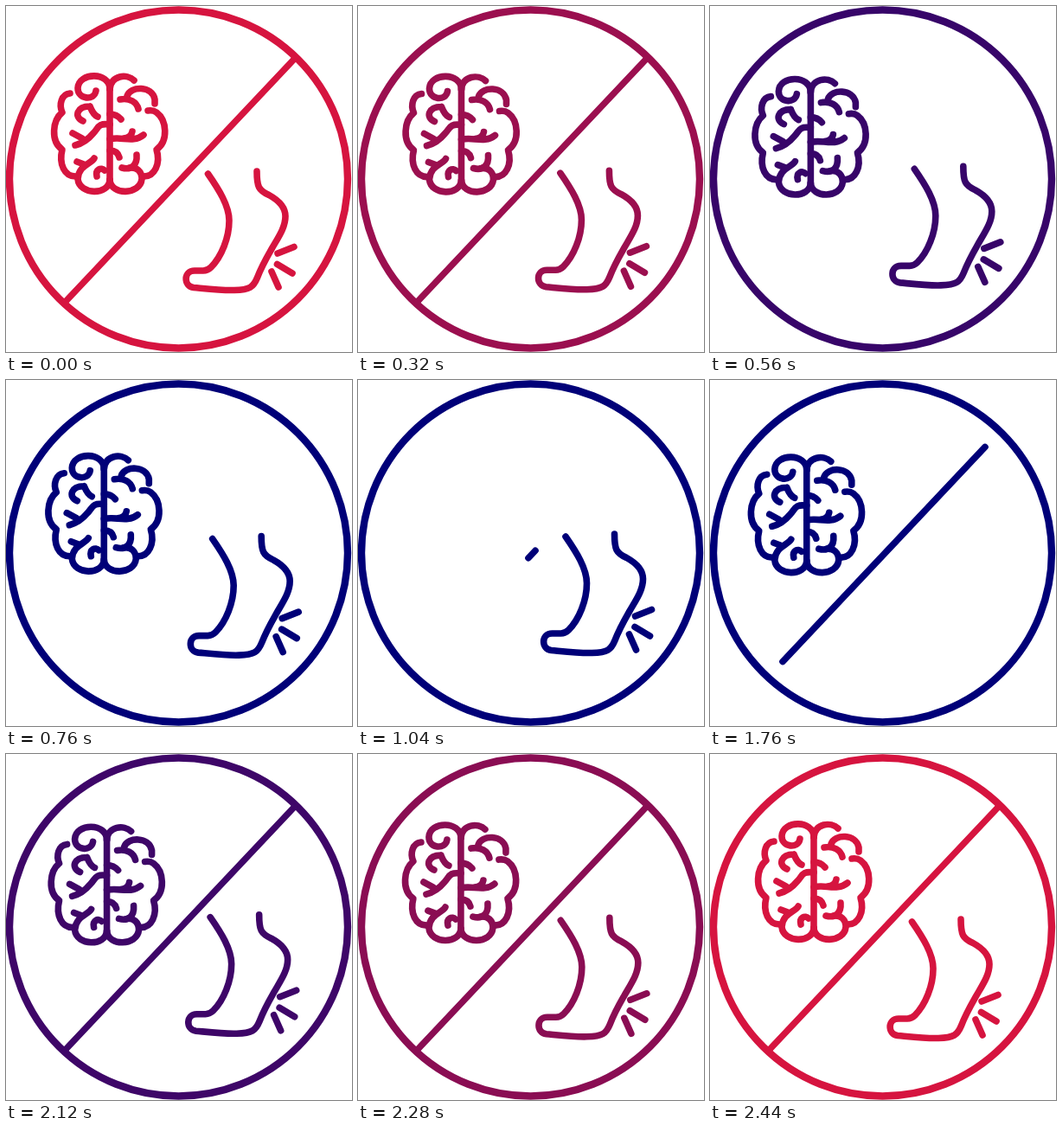
Recreate the animation shown at these times as an HTML page. Size 400 by 400 pixels, loop 2640 ms.

```html
<!DOCTYPE html>
<html lang="en">
<head>
<meta charset="utf-8">
<title>Mind and heel</title>
<style>
html, body { margin: 0; height: 100%; overflow: hidden; background: #fff; }
svg { display: block; width: 100vw; height: 100vh; fill: none; stroke: currentColor; stroke-width: 7.6; stroke-linecap: round; stroke-linejoin: round; }
</style>
</head>
<body>
<svg id="stage" viewBox="0 0 400 400">
  <circle cx="199.5" cy="200" r="195.5" stroke-width="8.4"/>
  <path id="slash"/>
  <g id="brain">
    <path d="M120 94V204"/>
    <!-- left half -->
    <path d="M120 96C120 76 84 76 83 95C83 108 102 110 104 98"/>
    <path d="M74 101C64 102 61 114 65 123C54 132 51 156 65 166C61 182 67 198 82 197"/>
    <path d="M89 133C78 128 82 116 97 116M97 116Q101 126 106 128"/>
    <path d="M120 137C106 135 107 141 101 147Q92 158 80 161M77 147L88 153"/>
    <path d="M82 180L90 183M102 176C98 183 84 184 83 200C85 219 119 219 120 201"/>
    <path d="M105 197C103 189 110 186 114 190"/>
    <!-- right half -->
    <path d="M120 96C121 80 140 78 148 86"/>
    <path d="M132 108C143 106 151 111 153 119M140 104C144 92 169 92 172 108V113"/>
    <path d="M164 121Q170 120 174 123C186 132 188 156 174 166C179 182 172 198 158 197"/>
    <path d="M120 125Q128 125 133 131"/>
    <path d="M120 154C132 150 147 159 159 149M136 153Q145 152 146 145"/>
    <path d="M120 167Q129 167 131 175M134 187C145 190 152 184 151 172"/>
    <path d="M143 187C151 186 157 191 157 200C155 219 121 219 120 201"/>
  </g>
  <g id="foot">
    <path d="M233.5 194C246 212 258 231 258 248C258 268 249 290 237 302Q233 306 228 306H218C205 306 205 324 217 325.5C233 327 250 329 264 328.5C282 328 286 325 290.5 314C296 300 299 295 307 281C315 267 323 256 323 243C323 231 314 224 304 218.5C292 213 290 209 290 191"/>
    <path d="M314 286L333 278.5M313.5 298.5L331 309M307 307L315 325"/>
  </g>
</svg>
<script>
const LOOP = 2640, STEP = 40;
const [stage, slash, brain, foot] = ["stage", "slash", "brain", "foot"].map(id => document.getElementById(id));
const red = [214, 20, 63], navy = [0, 0, 120];

const ramp = (t, a, b) => Math.min(1, Math.max(0, (t - a) / (b - a)));
const ease = (t, a, b) => (1 - Math.cos(Math.PI * ramp(t, a, b))) / 2;
const hide = (el, on) => el.style.display = on ? "none" : "";
const move = (el, x, y) => el.setAttribute("transform", `translate(${x} ${y})`);

function draw(now) {
  const t = Math.floor(now % LOOP / STEP) * STEP;

  const tint = ramp(t, 180, 690) - ramp(t, 1990, 2440);
  stage.style.color = `rgb(${red.map((c, i) => Math.round(c + (navy[i] - c) * tint))})`;

  // the halves drift apart and come back
  const apart = ease(t, 190, 1000) - ease(t, 1690, 2460);
  move(brain, -8.4 * apart, 8.4 * apart);
  move(foot, 6.5 * apart, -13 * apart);

  // each part drops out in turn; the slash regrows from its middle
  hide(slash, t >= 440 && t <= 920);
  hide(brain, t >= 920 && t < 1400);
  hide(foot, t >= 1400 && t < 1880);
  const grow = t < 440 ? 1 : ease(t, 920, 2000);
  const x = 132.5 * grow, y = 140.5 * grow;
  slash.setAttribute("d", `M${201 - x} ${201.5 + y}L${201 + x} ${201.5 - y}`);

  requestAnimationFrame(draw);
}
draw(performance.now());
</script>
</body>
</html>
```
